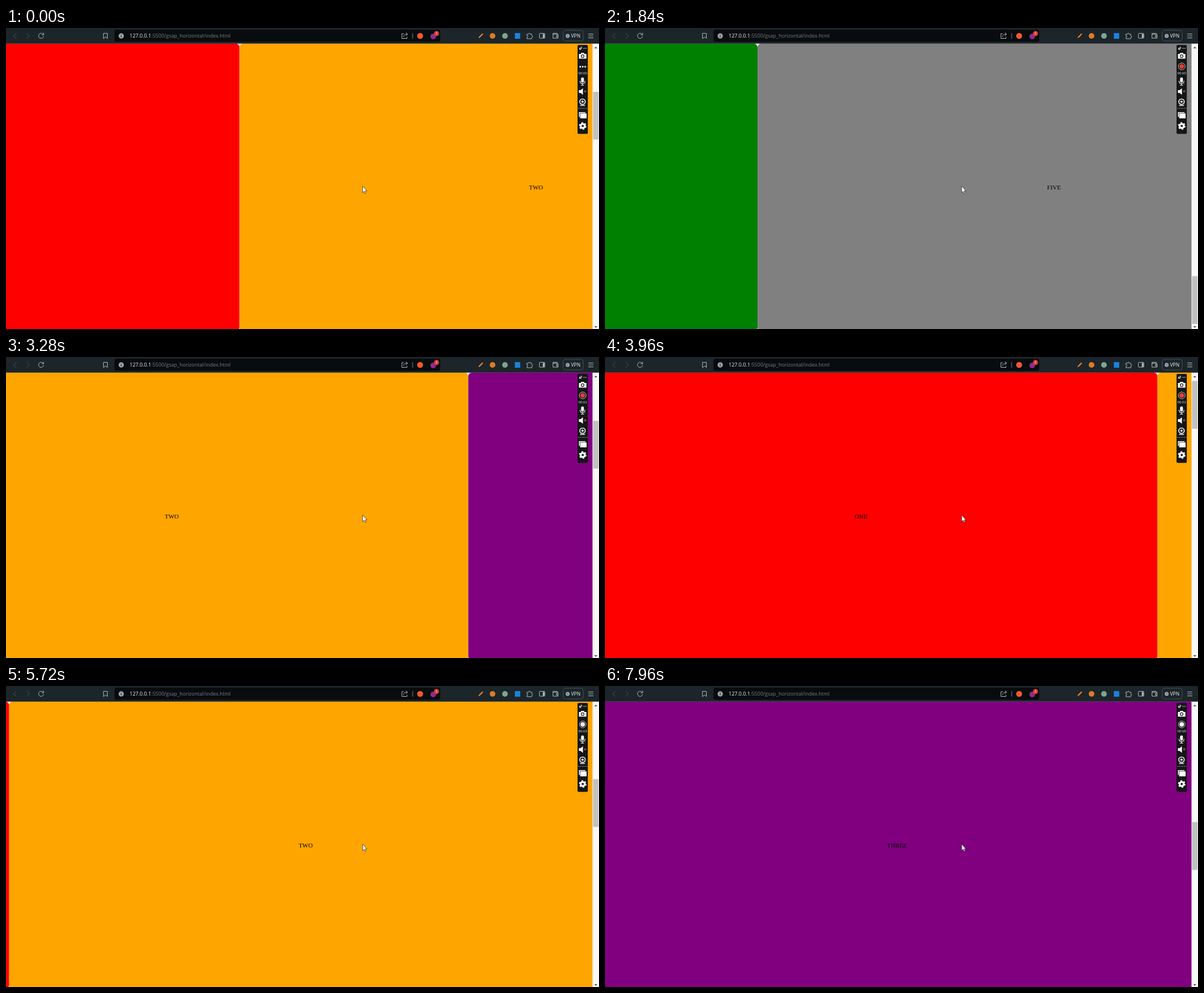
Write an HTML page that moves like this. It is 1050 px wide and 533 px high and loops after 8 s.

```html
<!DOCTYPE html>
<html lang="en">
<head>
<meta charset="utf-8">
<title>Horizontal scroll</title>
<style>
  html, body { margin: 0; width: 100%; height: 100%; overflow: hidden; background: #fff; }
  svg { display: block; width: 1050px; height: 533px; }
  .ui { font-family: "Open Sans", "Noto Sans", sans-serif; font-size: 9px; }
  .panel { font: 10.94px "Liberation Serif", Times, serif; text-anchor: middle; }
  .line { fill: none; stroke: #b4babd; stroke-width: 1; stroke-linecap: round; stroke-linejoin: round; }
</style>
</head>
<body>
<svg viewBox="0 0 1050 533">
  <rect width="1050" height="533" fill="#fff"/>
  <g id="panels" class="panel"></g>

  <g id="scrollbar">
    <rect x="1038.5" y="27" width="12" height="506" fill="#f8f8f8"/>
    <rect id="thumb" x="1039.5" width="9.5" height="84.5" fill="#c1c1c1"/>
    <path d="M1041.7 36l2.6-3 2.6 3z M1041.7 528l2.6 3 2.6-3z" fill="#505050"/>
  </g>

  <g id="browser" class="ui">
    <rect width="1050" height="27.7" fill="#1c2529"/>
    <rect x="192" y="3" width="577" height="21.5" rx="4" fill="#080c0f"/>
    <g class="line">
      <path d="M18 9.5l-4.500 4.500 4.500 4.500M37 9.500l4.500 4.500-4.500 4.500" stroke="#4c565b"/>
      <path d="M66 11.200a4.600 4.600 0 1 0 .7 3.600M66.700 9v3h-3"/>
      <path d="M173 9.500h6.500v9l-3.250-2.500-3.250 2.500z"/>
      <path d="M704 10h-3v8.500h9V16M704 15.500c0-3 2-4.500 6.500-4.500M708.300 8.500l2.700 2.500-2.700 2.500"/>
      <path d="M720 9.500v9" stroke="#7b8286"/>
      <path d="M922.500 11h2.500a1.700 1.700 0 0 1 3.400 0h2.600v2.500a1.700 1.700 0 0 1 0 3.300V19h-8.500v-2.500a1.500 1.500 0 0 0 0-3z"/>
      <rect x="944.500" y="9.500" width="9.500" height="8.500" rx="1"/>
      <path d="M952 10.500v7" stroke-width="3" stroke-linecap="butt"/>
      <path d="M976 11v-1.500h-7.500V18h9v-6.800h-9M977.500 13.500h-3v2.500h3"/>
      <rect x="986.500" y="4" width="35.500" height="19" rx="4" stroke="#465055"/>
      <path d="M1031.500 10.500h8M1031.500 14h8M1031.500 17.500h8"/>
    </g>
    <circle cx="204" cy="14" r="4.700" fill="#9ca3a7"/>
    <path d="M204 13.300v3M204 11.300v.8" stroke="#080c0f" stroke-width="1.200"/>
    <text x="219" y="17.200" fill="#777f84"><tspan fill="#f1f3f4">127.0.0.1</tspan>:5500/gsap_horizontal/index.html</text>
    <circle cx="733.300" cy="14" r="5.300" fill="#f0592b"/>
    <circle cx="756.500" cy="15" r="5" fill="#8e2a8b"/>
    <circle cx="762.300" cy="9.700" r="4.500" fill="#e33b2e"/>
    <text x="762.300" y="12" font-size="6.500" fill="#fff" text-anchor="middle">1</text>
    <path d="M836.500 18l1-2.500 6-6 1.500 1.500-6 6z" fill="#f08a32"/>
    <path d="M842.500 10.500l1-1 1.500 1.500-1 1z" fill="#e2483c"/>
    <circle cx="861.500" cy="14" r="5" fill="#db7b27"/>
    <circle cx="883.500" cy="14" r="5" fill="#7fa58d"/>
    <rect x="901" y="9" width="9.500" height="10" fill="#1683dc"/>
    <circle cx="994.500" cy="14" r="3.500" fill="#a1a7bb"/>
    <path d="M993 14h3" stroke="#30383d"/>
    <text x="1000.500" y="17" font-size="8.500" fill="#eef0f1">VPN</text>
  </g>

  <g id="recorder" fill="#fff">
    <rect x="1012" y="30" width="18.200" height="157.500" rx="2" fill="#141617"/>
    <path d="M1015 35h3.500v3.500h-3.500z M1017 33.500h3v3h-1" fill="#c8c8c8"/>
    <path d="M1017 36.500l2-2" stroke="#141617"/>
    <g fill="#ccc"><circle cx="1023" cy="36" r=".8"/><circle cx="1025.200" cy="36" r=".8"/><circle cx="1027.400" cy="36" r=".8"/></g>
    <path d="M1014.500 46h3l1.300-2h4.400l1.300 2h3.200v8.300h-13.200z"/>
    <circle cx="1021" cy="49.800" r="2.500" fill="none" stroke="#141617" stroke-width="1.200"/>
    <g id="dots"><circle cx="1016.800" cy="68.500" r="1.500"/><circle cx="1021.200" cy="68.500" r="1.500"/><circle cx="1025.600" cy="68.500" r="1.500"/></g>
    <g id="record">
      <circle cx="1021.200" cy="68" r="6" fill="none" stroke="#ccc"/>
      <circle id="pulse" cx="1021.200" cy="68" r="4"/>
    </g>
    <text id="clock" x="1021.200" y="81.500" text-anchor="middle" font-family="Liberation Sans, Arial, sans-serif" font-size="6.200" fill="#ddd"></text>
    <rect x="1018.300" y="87.500" width="5" height="9" rx="2.500"/>
    <path d="M1016.300 93.500c0 6.500 9 6.500 9 0M1020.800 98.500v2.700M1018 101.200h5.600" fill="none" stroke="#fff" stroke-width="1.100"/>
    <path d="M1024 97.500l2.500 2.500" stroke="#d84740"/>
    <path d="M1014.500 110h3l4-3.200v11.400l-4-3.200h-3z"/>
    <path d="M1024 110.700l3 3M1027 110.700l-3 3" stroke="#e35149" stroke-width="1.200"/>
    <circle cx="1020.800" cy="130.500" r="4.800" fill="none" stroke="#fff" stroke-width="1.600"/>
    <circle cx="1020.800" cy="130.500" r="2"/>
    <path d="M1016.500 137.300h8.500" stroke="#fff" stroke-width="1.400"/>
    <path d="M1024 134l2.500 2.500" stroke="#d84740"/>
    <path d="M1013 142.300h16.500" stroke="#999" stroke-dasharray="2 1"/>
    <path d="M1014.500 149h11.500v1.500h-10v7h-1.500z M1016.700 151.300h11.300v8.700h-11.300z"/>
    <circle cx="1021.200" cy="173.500" r="3.600" fill="none" stroke="#fff" stroke-width="3.300"/>
    <circle cx="1021.200" cy="173.500" r="5.700" fill="none" stroke="#fff" stroke-width="2" stroke-dasharray="2.980 2.980"/>
  </g>

  <path d="M631.500 280v11.500l2.600-2.400 1.800 4 1.800-.8-1.800-3.900h3.200z" fill="#fff" stroke="#222" stroke-width=".7"/>
</svg>
<script>
  const LOOP = 8000, STEP = 40, PANEL_WIDTH = 1050;
  const RECORD_START = 1400, CLOCK_START = 2060;
  const byId = id => document.getElementById(id);

  // [time, horizontal offset of the panel strip]
  const stripKeys = [
    [0, 636.5], [400, 1000], [960, 1727], [1400, 2800], [1840, 3930], [2200, 4190],
    [2480, 4150], [2850, 3000], [3280, 1281.5], [3700, 300], [4100, 20], [4400, 0],
    [4950, 0], [5160, 132], [5500, 750], [5900, 1180], [6200, 1220], [6600, 1134],
    [6950, 1060], [7300, 1650], [7650, 2150], [7960, 2108]
  ];
  // [time, top of the scrollbar thumb]
  const thumbKeys = [
    [0, 113], [500, 170], [960, 235], [1350, 345], [1840, 439.5], [2450, 439.5],
    [2850, 270], [3280, 113], [3650, 42.5], [4950, 42.5], [5160, 104], [5600, 165],
    [6100, 165], [6600, 148], [6900, 142], [7300, 235], [7500, 250], [7960, 241]
  ];

  // Monotone cubic interpolation: smooth, without overshoot between keys.
  function curve(keys) {
    const slope = i => (keys[i + 1][1] - keys[i][1]) / (keys[i + 1][0] - keys[i][0]);
    const tangent = i => {
      if (i === 0) return slope(0);
      if (i === keys.length - 1) return slope(i - 1);
      const a = slope(i - 1), b = slope(i);
      return a * b <= 0 ? 0 : 2 * a * b / (a + b);
    };
    return t => {
      let i = 0;
      while (i < keys.length - 2 && t >= keys[i + 1][0]) i++;
      const [t0, v0] = keys[i], [t1, v1] = keys[i + 1];
      const h = t1 - t0, u = Math.min(1, (t - t0) / h), w = 1 - u;
      return v0 * (1 + 2 * u) * w * w + v1 * u * u * (3 - 2 * u)
        + h * u * w * (tangent(i) * w - tangent(i + 1) * u);
    };
  }
  const stripAt = curve(stripKeys), thumbAt = curve(thumbKeys);

  const panels = [["ONE", "red"], ["TWO", "orange"], ["THREE", "purple"], ["FOUR", "green"], ["FIVE", "gray"]];
  byId("panels").innerHTML = panels.map(([label, color], i) => {
    const x = i * PANEL_WIDTH;
    return `<rect x="${x}" y="27.500" width="${PANEL_WIDTH}" height="509" rx="6.840" fill="${color}"/>
      <text x="${x + PANEL_WIDTH / 2}" y="286">${label}</text>`;
  }).join("");

  function draw(t) {
    byId("panels").setAttribute("transform", `translate(${-stripAt(t)})`);
    byId("thumb").setAttribute("y", thumbAt(t));

    const recording = t >= RECORD_START;
    byId("dots").setAttribute("visibility", recording ? "hidden" : "visible");
    byId("record").setAttribute("visibility", recording ? "visible" : "hidden");
    const glow = 0.5 + 0.5 * Math.cos(2 * Math.PI * (t - 40) / 720);
    const mix = from => Math.round(from + (255 - from) * glow);
    byId("pulse").setAttribute("fill", `rgb(${mix(238)},${mix(58)},${mix(48)})`);

    const seconds = Math.max(0, Math.floor((t - CLOCK_START) / 1000));
    byId("clock").textContent = "00:0" + seconds;
  }

  const start = performance.now();
  function tick() {
    const t = (performance.now() - start) % LOOP;
    draw(t < 2 * STEP ? 0 : Math.floor(t / STEP) * STEP);
    requestAnimationFrame(tick);
  }
  tick();
</script>
</body>
</html>
```
